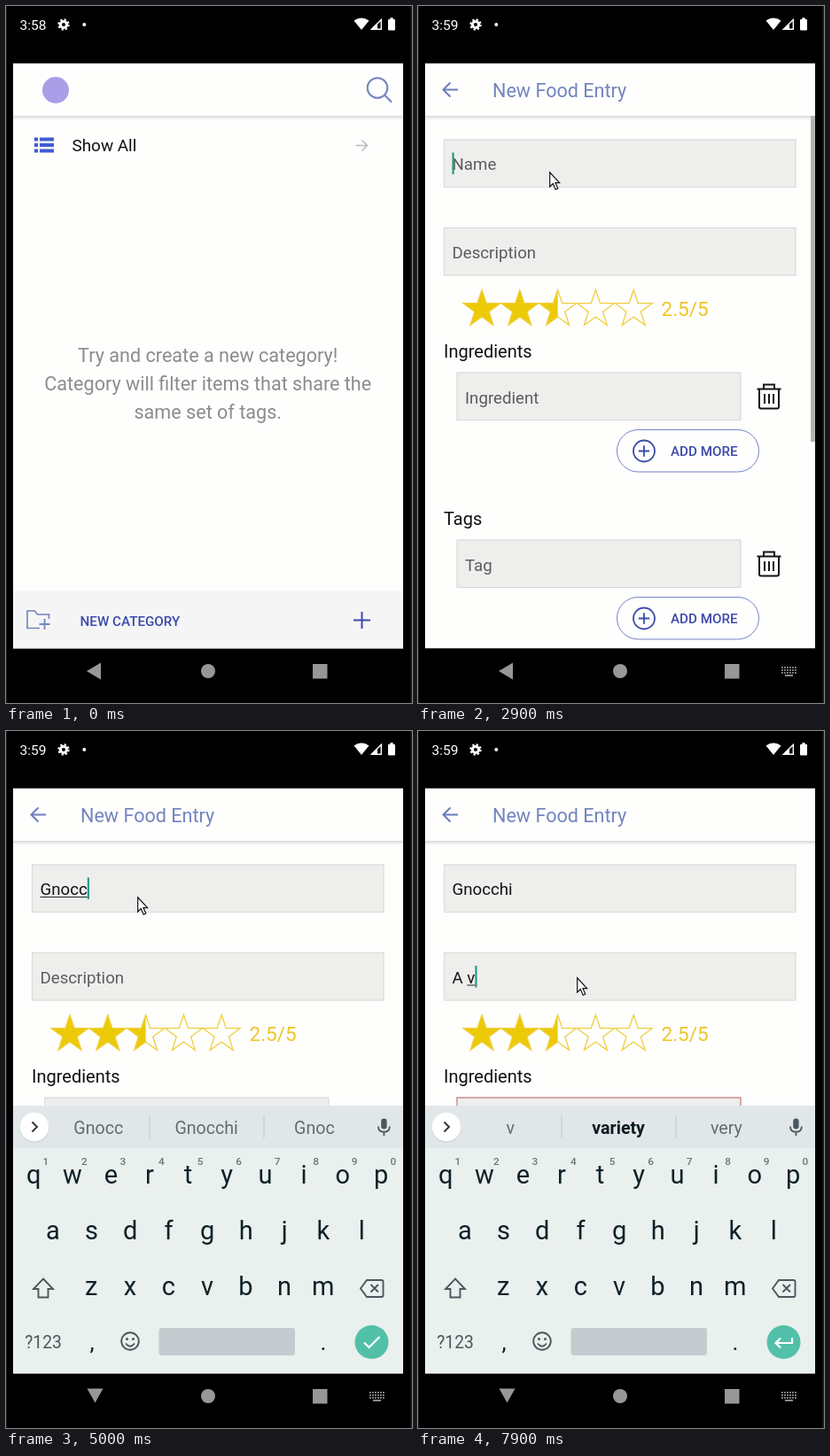
Write an HTML page with a canvas that moves like this. It is 458 px wide and 787 px high and loops after 8 s.

```html
<!DOCTYPE html>
<html lang="en">
<head>
<meta charset="utf-8">
<title>New Food Entry</title>
<style>
  html, body { margin: 0; width: 100%; height: 100%; overflow: hidden; background: #000; }
  canvas { display: block; }
</style>
</head>
<body>
<canvas id="stage" width="458" height="787"></canvas>
<script>
const ctx = document.getElementById('stage').getContext('2d');
const LOOP = 8000;
const PAGE = { x: 8, y: 64.5, w: 440, h: 661 };
const PAPER = '#fefefd', INDIGO = '#3d4aab', SLATE = '#7384bf', GOLD = '#ecca08', KEY_ICON = '#4c585e';

// [time, field, text, suggestions]; a leading * marks the bold suggestion
const TYPING = [
  [2800, 'name', ''],
  [4200, 'name', 'G', ['G', 'Good', 'Get']],
  [4400, 'name', 'Gn', ['Gn', 'In', 'On']],
  [4600, 'name', 'Gno', ['Gno', 'Know', 'Gnome']],
  [4800, 'name', 'Gnoc', ['Gnoc', 'Gnocchi', 'Knock']],
  [5000, 'name', 'Gnocc', ['Gnocc', 'Gnocchi', 'Gnoc']],
  [5600, 'name', 'Gnocch', ['Gnocch', 'Gnocchi', 'Gnoc']],
  [5700, 'name', 'Gnocchi', ['Gnocchi', 'Gnocchis', 'Gnoc']],
  [6700, 'description', ''],
  [7400, 'description', 'A', ['A', 'And', 'As']],
  [7600, 'description', 'A ', ['few', 'little', 'lot']],
  [7800, 'description', 'A v', ['v', '*variety', 'very']],
];

// [time, x, y]
const POINTER = [
  [800, 333, 599], [899, 333, 599], [900, 398, 674], [1099, 398, 674], [1100, 333, 652], [1199, 333, 652],
  [1200, 400, 682], [1900, 400, 682], [2100, 347, 669], [2400, 265, 390], [2700, 160, 92], [2800, 148, 187],
  [6199, 148, 187], [6200, 169, 245], [6300, 169, 245], [6500, 179, 278], [LOOP, 179, 278],
];

const within = (t, from, to) => t >= from && t < to;
const clamp01 = v => Math.min(1, Math.max(0, v));

function rect(x, y, w, h, color) {
  ctx.fillStyle = color;
  ctx.fillRect(x, y, w, h);
}
function disc(x, y, r, color) {
  ctx.fillStyle = color;
  ctx.beginPath();
  ctx.arc(x, y, r, 0, 7);
  ctx.fill();
}
function ring(x, y, r, color, width) {
  ctx.strokeStyle = color;
  ctx.lineWidth = width;
  ctx.beginPath();
  ctx.arc(x, y, r, 0, 7);
  ctx.stroke();
}
function fill(d, color) {
  ctx.fillStyle = color;
  ctx.fill(new Path2D(d));
}
function stroke(d, color, width) {
  ctx.strokeStyle = color;
  ctx.lineWidth = width;
  ctx.stroke(new Path2D(d));
}
function plus(x, y, arm, color, width) {
  stroke(`M${x - arm} ${y}h${2 * arm}M${x} ${y - arm}v${2 * arm}`, color, width);
}
function setFont(size, weight = 400) {
  ctx.font = `${weight} ${size}px Roboto, sans-serif`;
}
function text(s, x, y, size, color, weight = 400, align = 'left') {
  setFont(size, weight);
  ctx.textAlign = align;
  ctx.fillStyle = color;
  ctx.fillText(s, x, y);
}
function roundRect(x, y, w, h, r) {
  ctx.beginPath();
  ctx.roundRect(x, y, w, h, r);
}
function shifted(dx, dy, draw) {
  ctx.save();
  ctx.translate(dx, dy);
  draw();
  ctx.restore();
}

function drawStatusBar(t) {
  text(t < 300 ? '3:58' : '3:59', 15.5, 27, 15.5, '#fff');
  ring(65, 21, 3.6, '#fff', 3);
  ctx.setLineDash([2.2, 2.2]);
  ring(65, 21, 5.6, '#fff', 2.2);
  ctx.setLineDash([]);
  disc(88.3, 21, 2, '#fff');
  fill('M401 27L392.5 16.5Q401 10.5 409.5 16.5Z', '#fff');
  stroke('M412.5 26.3H423.3V15.5Z', '#fff', 1.4);
  fill('M411 27h8v-8z', '#fff');
  roundRect(431, 15, 8, 12.5, 1);
  ctx.fill();
  rect(433.3, 13.3, 3.4, 2, '#fff');
}

function drawNavBar(t) {
  const gray = '#979797';
  fill(t < 3000 ? 'M91 751L107 741.5V760.5Z' : 'M91.5 742.5H109.5L100.5 758.5Z', gray);
  disc(228, 751, 8, gray);
  rect(346, 743, 16.5, 16.5, gray);
  if (t < 2800) return;
  for (let row = 0; row < 3; row++)
    for (let col = 0; col < 6; col++) rect(410 + col * 3, 746 + row * 3, 1.8, 1.8, gray);
  rect(414, 755, 9, 1.8, gray);
}

function drawHeader() {
  const shade = ctx.createLinearGradient(0, 124, 0, 129);
  shade.addColorStop(0, 'rgba(0,0,0,.15)');
  shade.addColorStop(1, 'rgba(0,0,0,0)');
  rect(PAGE.x, 124, PAGE.w, 5, shade);
}

function drawHome() {
  rect(PAGE.x, PAGE.y, PAGE.w, PAGE.h, PAPER);
  drawHeader();
  disc(56, 95, 15, '#aa9ee8');
  ring(419, 92.5, 11.3, SLATE, 2);
  stroke('M427 100.5L435 108.5', SLATE, 2.2);

  for (const y of [148.5, 155, 161.5]) {
    rect(32, y, 4, 4, '#3f5bd3');
    rect(38, y, 16, 4, '#3f5bd3');
  }
  text('Show All', 74.5, 164, 18.9, '#111');
  stroke('M394.5 157.5H407M401.5 151.5L407.5 157.5L401.5 163.5', '#bdbdbd', 1.6);

  ['Try and create a new category!', 'Category will filter items that share the', 'same set of tags.']
    .forEach((line, i) => text(line, 227.7, 401.5 + i * 32, 21.6, '#8c8c8c', 400, 'center'));

  rect(PAGE.x, 660, PAGE.w, 66, '#f5f5f5');
  stroke('M38 702.5H24V683h8.5l3 4H48.5V692', SLATE, 1.6);
  plus(43.5, 698, 6, SLATE, 1.8);
  text('NEW CATEGORY', 83.5, 699.5, 15.2, INDIGO, 500);
  plus(401.5, 693.5, 9.5, INDIGO, 2);
}

function starPath(cx, cy, r) {
  let d = '';
  for (let i = 0; i < 10; i++) {
    const a = i * Math.PI / 5, len = i % 2 ? r * 0.39 : r;
    d += `${i ? 'L' : 'M'}${cx + len * Math.sin(a)} ${cy - len * Math.cos(a)}`;
  }
  return d + 'Z';
}

function drawRating() {
  for (let i = 0; i < 5; i++) {
    const x = 72 + i * 42.8, star = starPath(x, 342.5, 22);
    ctx.save();
    ctx.beginPath();
    ctx.rect(x - 23, 318, 46 * clamp01(2.5 - i), 48);
    ctx.clip();
    fill(star, GOLD);
    ctx.restore();
    stroke(star, '#efcf3c', 1.3);
  }
  text('2.5/5', 274.5, 350, 22.5, '#efc525');
}

function drawField(x, y, w, h, border = '#d8d8d7') {
  rect(x, y, w, h, '#eeeeed');
  ctx.strokeStyle = border;
  ctx.lineWidth = 1;
  ctx.strokeRect(x + .5, y + .5, w - 1, h - 1);
}

function drawTextInput(y, placeholder, value, focused, caretOn) {
  const x = 38.5, base = y + 34.5;
  drawField(29, y, 397.5, 54.5);
  text(value || placeholder, x, base, 18.7, value ? '#151515' : '#5c5c5c');
  if (!focused) return;
  const end = x + (value ? ctx.measureText(value).width : 0);
  const word = value.split(' ').pop();
  if (word) {
    const width = ctx.measureText(word).width;
    rect(end - width, base + 2, width, 1, '#222');
  }
  if (caretOn) rect(end, y + 15, 2.2, 24.5, '#279a89');
}

function drawListSection(title, placeholder, border) {
  text(title, 29, 397, 20, '#111');
  drawField(43.5, 413.5, 321, 54.5, border);
  text(placeholder, 53, 448.5, 18.7, '#5c5c5c');
  stroke('M382.5 432.5H409.5M390 432V427.5H402V432M385 433V452.5Q385 454.5 387 454.5H405Q407 454.5 407 452.5V433' +
    'M391 438V449M396 438V449M401 438V449', '#151515', 2);
  roundRect(224.5, 478.5, 160, 47.5, 23.7);
  ctx.strokeStyle = '#7482c8';
  ctx.lineWidth = 1;
  ctx.stroke();
  ring(255, 502.5, 12, INDIGO, 1.8);
  plus(255, 502.5, 6.2, INDIGO, 1.8);
  text('ADD MORE', 285, 508, 15.2, INDIGO, 500);
}

function drawForm(t, active) {
  rect(PAGE.x, PAGE.y, PAGE.w, PAGE.h, PAPER);
  drawHeader();
  stroke('M45 94.5H29M36.5 86.5L28.5 94.5L36.5 102.5', '#6b7dbd', 2);
  text('New Food Entry', 84, 102.8, 21.6, SLATE);

  const [, field, value] = active || [];
  const caretOn = !within(t, 3300, 3800) && !within(t, 6200, 6700);
  const onName = field === 'name', onDescription = field === 'description';
  drawTextInput(150.5, 'Name', onDescription ? 'Gnocchi' : value || '', onName, caretOn);
  drawTextInput(250, 'Description', onDescription ? value : '', onDescription, caretOn);
  drawRating();
  drawListSection('Ingredients', 'Ingredient', onDescription ? '#c75c5c' : undefined);
  shifted(0, 189, () => drawListSection('Tags', 'Tag'));

  if (within(t, 2800, 3800)) {
    ctx.globalAlpha = 1 - clamp01((t - 3550) / 250);
    rect(443, 124, 5, t < 3000 ? 368 : 92, '#b3b3b2');
    ctx.globalAlpha = 1;
  }
}

function drawToolbar() {
  ring(90, 445.5, 6, KEY_ICON, 2);
  stroke('M94.5 450L100.5 456', KEY_ICON, 2.2);
  stroke('M149.5 438.5H162Q164 438.5 164 440.5V449L157.5 455.5H149.5Q147.5 455.5 147.5 453.5V440.5Q147.5 438.5 149.5 438.5Z' +
    'M164 449H157.5V455.5M151.5 447.5Q155.5 452.5 160 447.5M152.5 443v2M159 443v2', KEY_ICON, 1.6);
  text('GIF', 219.5, 452, 14, KEY_ICON, 900, 'center');
  rect(276, 438, 18, 18, '#69757b');
  rect(323.5, 435.5, 1, 23.5, '#c3c9cc');
  for (const x of [357, 363.5, 370]) disc(x, 447.5, 2.3, KEY_ICON);
}

function drawSuggestions(words) {
  words.forEach((word, i) => {
    const bold = word[0] === '*';
    text(bold ? word.slice(1) : word, 104.3 + i * 121.8, 454.5, 19.6, bold ? '#0d1b20' : '#636c71', bold ? 700 : 400, 'center');
  });
  rect(161.5, 434, 1, 26, '#c3c9cc');
  rect(290.5, 434, 1, 26, '#c3c9cc');
}

function drawKeys(upper) {
  const rows = [['QWERTYUIOP', 31.3, 514], ['ASDFGHJKL', 53, 577], ['ZXCVBNM', 96.3, 640]];
  for (const [letters, x, y] of rows)
    [...letters].forEach((c, i) =>
      text(upper ? c : c.toLowerCase(), x + i * 43.55, upper ? y : y - 3, 29, '#0e2128', 400, 'center'));
  [...'1234567890'].forEach((c, i) => text(c, 44.8 + i * 43.55, 490, 11.8, '#6b757a', 500, 'center'));

  const shift = 'M42 618.5L53 630H47.5V639.5H36.5V630H31Z';
  if (upper) fill(shift, KEY_ICON);
  else stroke(shift, KEY_ICON, 1.9);
  stroke('M407 620H423.5Q425.5 620 425.5 622V637Q425.5 639 423.5 639H407L400 629.5ZM411.5 625L420 633.5M420 625L411.5 633.5', KEY_ICON, 1.9);

  text('?123', 42, 696.5, 19.3, KEY_ICON, 400, 'center');
  text(',', 97, 699, 26, '#0e2128', 400, 'center');
  text('.', 358, 699, 26, '#0e2128', 400, 'center');
  ring(140, 689, 9.8, KEY_ICON, 1.9);
  disc(136.5, 686.5, 1.5, KEY_ICON);
  disc(143.5, 686.5, 1.5, KEY_ICON);
  stroke('M135 691.5Q140 698 145 691.5', KEY_ICON, 1.9);
  roundRect(172.5, 674, 153.5, 31, 3);
  ctx.fillStyle = '#c5cbce';
  ctx.fill();
}

function drawKeyboard([, field, , words]) {
  rect(PAGE.x, 423, PAGE.w, 303, '#e9f0ed');
  rect(PAGE.x, 423, PAGE.w, 48, '#e1e7e9');
  disc(32, 448, 16.8, '#d0d6d8');
  disc(32, 447, 16.3, '#fff');
  stroke(words ? 'M29.5 441.5L35 447L29.5 452.5' : 'M34.5 441.5L29 447L34.5 452.5', '#30393d', 2);
  if (words) drawSuggestions(words);
  else drawToolbar();

  roundRect(423.2, 437.5, 6.4, 12, 3.2);
  ctx.fillStyle = KEY_ICON;
  ctx.fill();
  stroke('M420 446.5Q420 452.7 426.4 452.7Q432.8 452.7 432.8 446.5M426.4 452.5V457', KEY_ICON, 1.8);

  drawKeys(!words);
  disc(412.5, 690, 19, '#52c0a8');
  stroke(field === 'name' ? 'M404 690.5L409.5 696L421.5 684' : 'M422 685V691H404M409 685.5L403.5 691L409 696.5', '#fff', 2.2);
}

function drawPointer(t) {
  const next = POINTER.findIndex(p => p[0] > t);
  if (next < 1) return;
  const [t0, x0, y0] = POINTER[next - 1], [t1, x1, y1] = POINTER[next];
  const k = (t - t0) / (t1 - t0);
  shifted(x0 + (x1 - x0) * k, y0 + (y1 - y0) * k, () => {
    const arrow = 'M.7 .8V17L4.3 13.6L7.2 20.2L9.8 19L7 12.7H11.6Z';
    fill(arrow, '#fff');
    stroke(arrow, '#111', 1.2);
  });
}

// Critically damped spring: share of the slide still to go
function slideRemaining(t) {
  const x = Math.max(0, t - 1908) * 0.01826;
  return Math.exp(-x) * (1 + x);
}

function draw(t) {
  const active = TYPING.findLast(step => step[0] <= t);
  const remaining = slideRemaining(t), done = 1 - remaining;

  rect(0, 0, 458, 787, '#000');
  rect(0, 0, 1.2, 787, '#1d1d1d');
  rect(456.5, 0, 1.5, 787, '#222');
  drawStatusBar(t);
  drawNavBar(t);

  ctx.save();
  ctx.beginPath();
  ctx.rect(PAGE.x, PAGE.y, PAGE.w, PAGE.h);
  ctx.clip();
  if (remaining > 0.001) {
    shifted(-0.3 * PAGE.w * done, 0, drawHome);
    rect(PAGE.x, PAGE.y, PAGE.w, PAGE.h, `rgba(0,0,0,${0.07 * done})`);
  }
  if (done > 0) shifted(PAGE.w * remaining, 0, () => drawForm(t, active));
  if (t > 2950) {
    const hidden = (1 - clamp01((t - 2950) / 300)) ** 3;
    shifted(0, 303 * hidden, () => drawKeyboard(active));
  }
  ctx.restore();
  drawPointer(t);
}

const start = performance.now();
function tick() {
  draw((performance.now() - start) % LOOP);
  requestAnimationFrame(tick);
}
tick();
</script>
</body>
</html>
```
